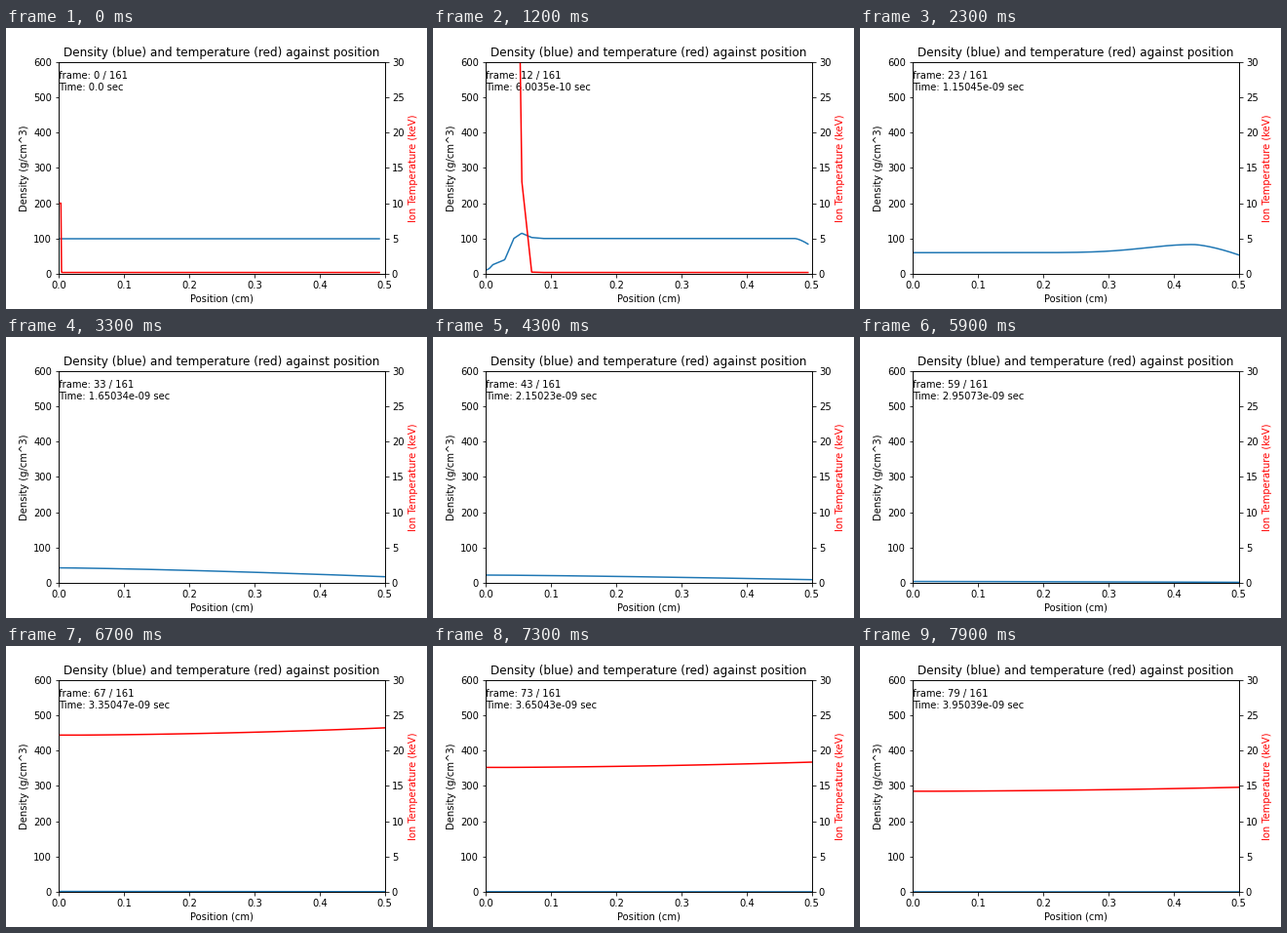
Animation of 432 by 288 pixels, one loop 8000 ms. Source, as a matplotlib script:

```python
import numpy as np
import matplotlib.pyplot as plt
from matplotlib.animation import FuncAnimation

FRAMES, INTERVAL, TOTAL = 80, 100, 161
BREAKOUT = 23  # step at which the blast reaches the outer surface


def seconds(n):
    """Output every 50 ps, plus a drifting overshoot of the solver step."""
    over = np.interp(n, [0, 12, 23, 43, 59, 67, 79],
                     [0, 35, 45, 23, 73, 47, 39])
    return n * 5e-11 + over * 1e-14


def blast_radius(n):
    return 0.0035 + 0.00655 * np.expm1(0.1822 * n)


def surface(n):
    return 0.4915 + 1.7e-5 * n ** 2


def compressed(x, n):
    """Density while the blast crosses the fuel and the surface expands."""
    s = x / blast_radius(n)
    shell = np.interp(s, [0, .1, .2, .53, .78, 1, 1.27, 1.6],
                      [10, 15, 26, 40, 100, 115, 103, 100])
    shell = 100 + (shell - 100) * min(n / 4, 1)
    swell = 60 + 23 * np.exp(-(4.3 * np.minimum(s - 1, 0)) ** 2)
    mix = np.clip((n - 12) / (BREAKOUT - 12), 0, 1)
    edge = 0.49 - 1.13e-4 * n ** 2
    loss = 1.3 * n * np.clip((x - edge) / (surface(n) - edge), 0, 1) ** 1.5
    return shell * (1 - mix) + swell * mix - loss


def density(n):
    x = np.linspace(0, surface(min(n, BREAKOUT)), 400)
    if n <= BREAKOUT:
        return x, compressed(x, n)
    m = n - BREAKOUT
    fade = min(m / 8, 1)
    decay = np.exp(-0.0188 * m - 0.00156 * m ** 2)
    swell = compressed(x / (1 + 0.05 * m), BREAKOUT)
    slope = 60 * (1 - 0.59 * (x / 0.5) ** 1.35)
    return x, decay * (swell * (1 - fade) + slope * fade)


def temperature(n):
    if n < BREAKOUT:  # hot core behind a heat front that outruns the blast
        radius = blast_radius(n) * (1 + (n / BREAKOUT) ** 8)
        x = np.array([0, 0.75, 1, 1.27, 1.6]) * radius
        core, shoulder = 10 * np.exp(0.195 * n), 10 * np.exp(0.022 * n)
        return (np.append(x, max(surface(n), x[-1])),
                [core, core, shoulder, 0.25, 0.2, 0.2])
    x = np.linspace(0, 0.5, 60)
    u = np.clip((x - 0.035) / 0.465, 0, 1)
    rise = 1 + 3.1 / n * (0.3 * u + 0.7 * u ** 2)
    return x, 22.17 * (67 / n) ** 2.69 * rise


fig, ax = plt.subplots(figsize=(6, 4), dpi=72)
fig.subplots_adjust(left=0.125, right=0.9, bottom=0.125, top=0.88)
ax2 = ax.twinx()
ax.set(xlim=(0, 0.5), ylim=(0, 600), xlabel="Position (cm)",
       ylabel="Density (g/cm^3)",
       title="Density (blue) and temperature (red) against position")
ax2.set_ylim(0, 30)
ax2.set_ylabel("Ion Temperature (keV)", color="red")
rho_line, = ax.plot([], [])
temp_line, = ax2.plot([], [], color="red")
label = ax.text(0, 520, "")


def update(n):
    rho_line.set_data(*density(n))
    temp_line.set_data(*temperature(n))
    stamp = f"{seconds(n):.6g}" if n else "0.0"
    label.set_text(f"frame: {n} / {TOTAL}\nTime: {stamp} sec")
    return rho_line, temp_line, label


anim = FuncAnimation(fig, update, frames=FRAMES, interval=INTERVAL)
plt.show()
```
